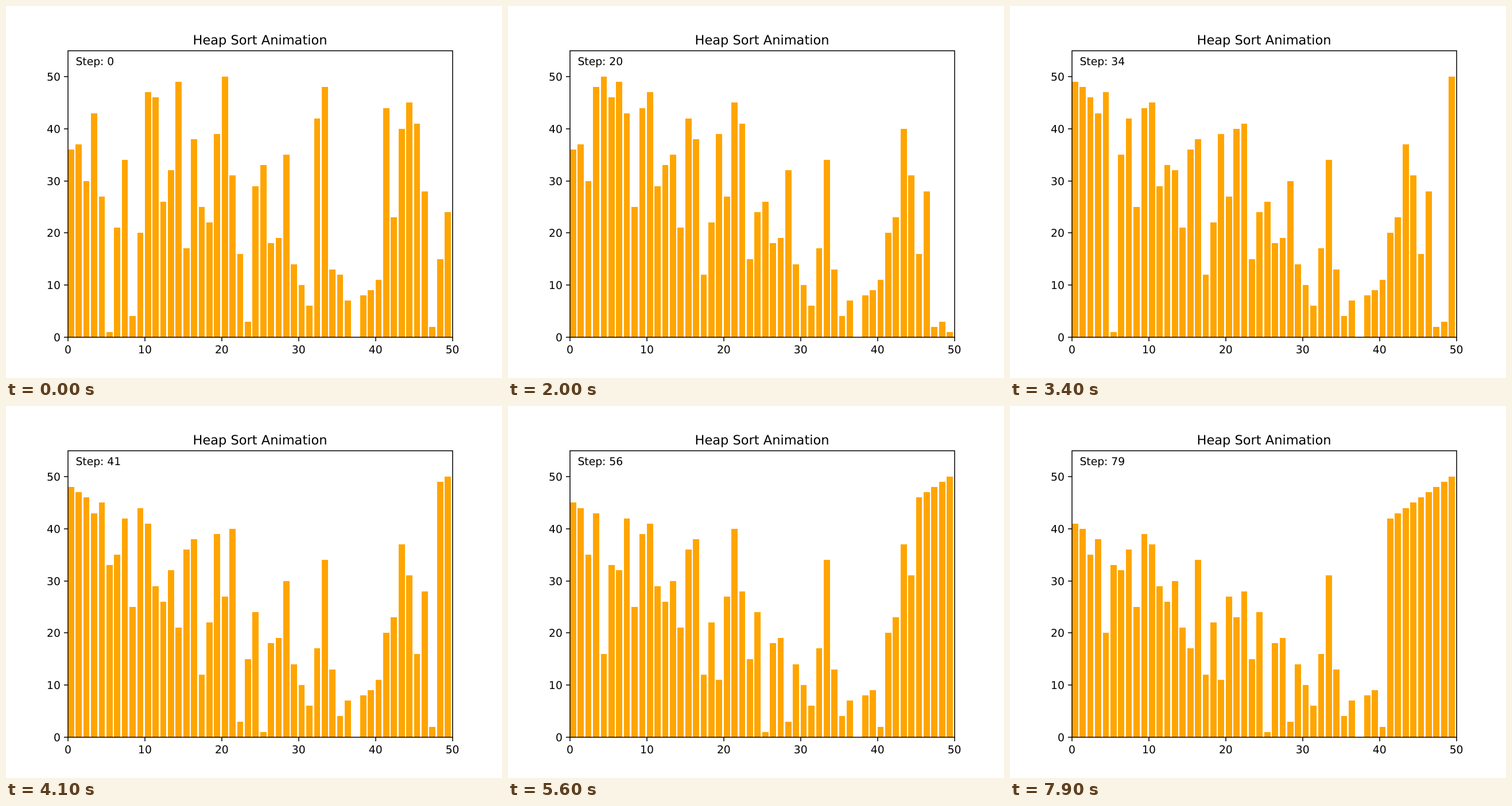
These frames come from a looping animation (864 px wide and 648 px high, 8000 ms). An HTML page:

```html
<!DOCTYPE html>
<html lang="en">
<head>
<meta charset="utf-8">
<title>Heap Sort Animation</title>
<style>
  html, body { margin: 0; width: 100%; height: 100%; overflow: hidden; background: #fff; }
  svg { display: block; width: 864px; height: 648px; }
  text { font: 18.75px "DejaVu Sans", Verdana, sans-serif; text-rendering: geometricPrecision; white-space: pre; }
  .title { font-size: 22.5px; }
  .mid { text-anchor: middle; }
  .end { text-anchor: end; }
  #bars { fill: #ffa500; }
  #axes { fill: none; stroke: #000; stroke-width: 1.5; }
</style>
</head>
<body>
<svg viewBox="0 0 864 648">
  <g id="bars" shape-rendering="crispEdges"></g>
  <g id="axes"><rect x="108" y="78" width="670" height="499"/></g>
  <g id="labels">
    <text class="title mid" x="442.5" y="67">Heap Sort Animation</text>
    <text id="step" x="121.4" y="103">Step: 0</text>
  </g>
</svg>
<script>
const STEP_MS = 100, STEPS = 80;
const start = [
  36, 37, 30, 43, 27, 1, 21, 34, 4, 20, 47, 46, 26, 32, 49, 17, 38,
  25, 22, 39, 50, 31, 16, 3, 29, 33, 18, 19, 35, 14, 10, 6, 42, 48,
  13, 12, 7, 0, 8, 9, 11, 44, 23, 40, 45, 41, 28, 2, 15, 24
];

// Data to whole pixels
const px = v => Math.round(108 + v * 13.392);
const py = v => Math.round(576.72 - v * 9.072);

const $ = id => document.getElementById(id);
function add(parent, tag, attrs, text = "") {
  const el = document.createElementNS("http://www.w3.org/2000/svg", tag);
  for (const key in attrs) el.setAttribute(key, attrs[key]);
  el.textContent = text;
  return parent.appendChild(el);
}

function* siftDown(a, size, i) {
  for (;;) {
    let top = i;
    for (const child of [2 * i + 1, 2 * i + 2])
      if (child < size && a[child] > a[top]) top = child;
    if (top === i) return;
    [a[i], a[top]] = [a[top], a[i]];
    yield;
    i = top;
  }
}

function* heapSort(a) {
  const n = a.length;
  for (let i = n >> 1; i >= 0; i--) yield* siftDown(a, n, i);
  for (let last = n - 1; last > 0; last--) {
    [a[0], a[last]] = [a[last], a[0]];
    yield;
    yield* siftDown(a, last, 0);
  }
}

// One snapshot per swap
const work = [...start], sorter = heapSort(work), states = [];
while (states.length < STEPS) {
  states.push([...work]);
  sorter.next();
}

for (let v = 0; v <= 50; v += 10) {
  const x = px(v), y = py(v);
  add($("axes"), "path", { d: `M${x} 577v7M108 ${y}h-7` });
  add($("labels"), "text", { class: "mid", x: 108 + v * 13.392, y: 605 }, v);
  add($("labels"), "text", { class: "end", x: 94.9, y: y + 7 }, v);
}

const bars = start.map((_, i) =>
  add($("bars"), "rect", { x: px(i), width: px(i + 0.8) - px(i) }));

function show(step) {
  states[step].forEach((v, i) => {
    bars[i].setAttribute("y", py(v));
    bars[i].setAttribute("height", py(0) - py(v));
  });
  $("step").textContent = "Step: " + step;
}

const t0 = performance.now();
let shown = -1;
function tick() {
  const step = Math.floor((performance.now() - t0 + 0.5) / STEP_MS) % STEPS;
  if (step !== shown) show(shown = step);
  requestAnimationFrame(tick);
}
tick();
</script>
</body>
</html>
```
